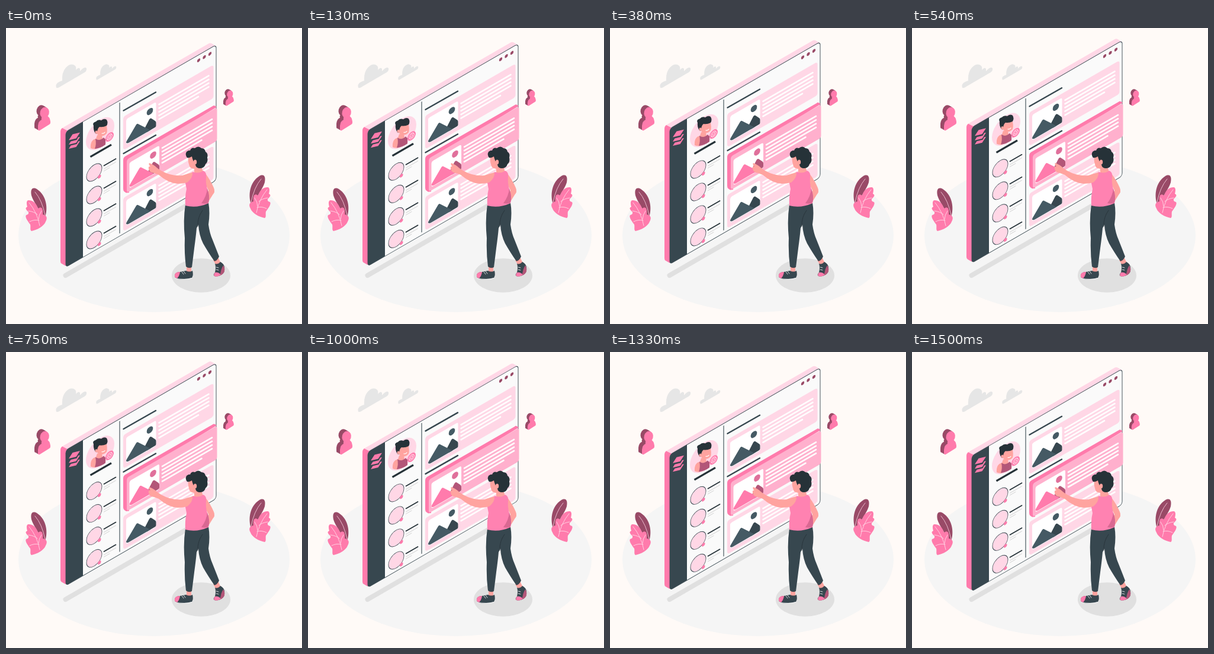
These frames come from a looping animation (500 px wide and 500 px high, 1540 ms). An HTML page:

```html
<!DOCTYPE html>
<html lang="en">
<head>
<meta charset="utf-8">
<title>Floating interface</title>
<style>
  html, body { margin: 0; width: 100%; height: 100%; overflow: hidden; background: #fffaf7; }
  svg { display: block; width: 100vw; height: 100vh; }
  .pink { fill: #ff7bac; }
  .pale { fill: #ffd7e6; }
  .plum { fill: #994a67; }
  .slate { fill: #37474f; }
  .skin { fill: #ffa39f; }
  .hair { fill: #263238; }
  .white { fill: #fff; }
  .line { fill: none; stroke-linecap: round; stroke-linejoin: round; }
</style>
</head>
<body>
<svg viewBox="0 0 500 500">
  <defs>
    <path id="cloud" d="M85 101Q83 95 88 92Q91 90 95 89Q94 75 101 67Q110 58 117 64Q119 66 118 71Q123 65 125 69V73Q133 64 136 68Q137 73 131 76L90 100Q87 102 85 101Z" fill="#e6e6e6"/>
    <g id="userShape">
      <ellipse cx="65.200" cy="143" rx="7.600" ry="9.300" transform="rotate(15 65.200 143)"/>
      <path d="M54 171V165Q55 157 60 155Q59 152 61 150L69 148Q74 150 75 158V160Q75 162 73 163L57 173Q54 174 54 171Z"/>
    </g>
    <g id="user">
      <g class="plum">
        <use href="#userShape" x="-6" y="-3.500"/>
        <use href="#userShape" x="-4" y="-2.400"/>
        <use href="#userShape" x="-2" y="-1.200"/>
      </g>
      <use href="#userShape" class="pink"/>
    </g>
    <g id="plant">
      <path class="plum" d="M66 320C71 305 69 283 52 272C44 268 41 273 43 283C46 293 54 302 62 320Z"/>
      <path class="line" d="M49 277Q61 291 66 316" stroke="#ffd7e6" stroke-width=".8"/>
      <path class="pink" d="M43 343C40 341 42 337 41 332C35 324 32 319 34 316Q39 315 38 311C33 306 32 304 36 302C34 295 35 291 38 291C46 291 52 297 54 305C60 301 63 304 62 315C68 316 71 320 67 327C64 335 53 341 43 343Z"/>
      <path class="line" d="M39 295Q53 312 57 334M38 309Q47 310 53 315M40 327Q48 323 56 325M60 309Q55 316 55 323" stroke="#ffe4ee" stroke-width=".8"/>
    </g>
    <g id="row">
      <circle r="13" transform="matrix(1 -.5774 0 1 149 244)" class="pale" stroke="#37474f" stroke-width=".8"/>
      <circle r="2.800" transform="matrix(1 -.5774 0 1 157.800 251)" class="pink"/>
      <path class="line" d="M165.500 232.500L185.500 221" stroke="#263238" stroke-width="1.800"/>
      <path class="line" d="M165.500 238L185.500 226.500M165.500 241.500L175 236" stroke="#c7c7c7" stroke-width=".8"/>
    </g>
    <!-- Peaks take their colours from the card that holds them -->
    <g id="cardContent">
      <rect width="50.500" height="43" rx="3" transform="matrix(1 -.5774 0 1 203 154)" class="white"/>
      <path d="M234 170L242 154.500Q244 151.500 246 153L252 157Q253.500 158 253.500 160V165Q253.500 167 251.500 168L238 176Z" fill="var(--small)"/>
      <path d="M204 190.500L219.500 164Q221.500 160.500 224 162.500L244 172.500L207 194Q201 196 204 190.500Z" fill="var(--big)"/>
      <circle r="5.300" transform="matrix(1 -.5774 0 1 243 141)" fill="var(--sun)"/>
      <path class="line" d="M258.500 129L342.500 80.500M258.500 135.300L342.500 86.800M258.500 141.600L342.500 93.100M258.500 147.900L342.500 99.400M258.500 154.200L325 115.800" stroke="#fff" stroke-width="2.600"/>
    </g>
    <rect id="cardFace" width="152.500" height="56.500" rx="4" transform="matrix(1 -.5774 0 1 198 150)"/>
    <g id="card" style="--big:#455a64;--small:#37474f;--sun:#455a64">
      <use href="#cardFace" class="pale"/>
      <use href="#cardContent"/>
    </g>
  </defs>

  <ellipse cx="250" cy="350.500" rx="229" ry="129.500" fill="#f5f5f5"/>
  <path class="line" d="M100.500 418L322 290" stroke="#e0e0e0" stroke-width="8"/>
  <ellipse cx="329.500" cy="418" rx="49.500" ry="28.700" fill="#e0e0e0"/>
  <use href="#cloud"/>
  <use href="#cloud" transform="translate(96.500 20.500) scale(.66)"/>
  <use href="#user"/>
  <use href="#user" transform="translate(335.300 17.200) scale(.66)"/>
  <use href="#plant"/>
  <use href="#plant" transform="translate(480 -22) scale(-1 1)"/>

  <g id="panel">
    <path class="pale" d="M94 169.500L342 26.500Q345 24.500 348 26.500L354 30L350 35L104 178Z"/>
    <path class="pink" d="M92 175Q92 171 95 169L105 174Q101 177 101 181V402L94 398Q92 397 92 394Z"/>
    <g transform="matrix(1 -.5774 0 1 101 175)">
      <rect width="254" height="229" rx="5" fill="#fafafa" stroke="#37474f" stroke-width=".9"/>
      <path class="slate" d="M0 5Q0 0 5 0H29V229H5Q0 229 0 224Z"/>
      <path class="line" d="M91 4V224" stroke="#37474f" stroke-width="1.100"/>
      <g class="plum">
        <circle cx="224.500" cy="9.200" r="2.700"/>
        <circle cx="234" cy="9.200" r="2.700"/>
        <circle cx="243.500" cy="9.200" r="2.700"/>
      </g>
      <circle class="pale" cx="58" cy="37" r="24"/>
    </g>
    <path class="pink" d="M106 189.500L112.500 179.500L125 176.500L118.500 186.500ZM106 197L109.500 191.500L119.500 189L122 184.500L125 184L118.500 194ZM106 204L109.500 198.500L119.500 196L122 191.500L125 191L118.500 201Z"/>

    <path class="skin" d="M152 187Q142 189 143 203Q147 205 153 204L156 195L163 187L162 181H154Z"/>
    <path fill="#b35678" d="M151 187Q158 192 165 185L168 188V197Q160 203 150 204Q153 196 151 187Z"/>
    <path class="skin" d="M151 167L169 161Q172 172 170 178Q165 184 157 182Q151 178 151 167Z"/>
    <path class="hair" d="M151 178Q147 172 148 165Q145 160 152 158Q155 154 161 156Q166 152 170 155Q173 160 170 165Q164 168 158 167Q155 169 154 175L153 179Z"/>
    <ellipse class="skin" cx="152.500" cy="176" rx="2" ry="2.700"/>
    <path class="line" d="M162 178Q165 178.500 167 176" stroke="#fff" stroke-width="1.200"/>
    <g transform="matrix(1 -.5774 0 1 175 184)">
      <circle class="pink" r="7"/>
      <circle class="line" r="4.300" stroke="#fff" stroke-width=".8"/>
      <circle class="line" r="2" stroke="#fff" stroke-width=".8"/>
    </g>
    <path d="M142.500 217.500L178 197" stroke="#263238" stroke-width="3.200"/>

    <use href="#row"/>
    <use href="#row" y="38"/>
    <use href="#row" y="76"/>
    <use href="#row" y="114"/>

    <path class="line" d="M198.500 139.500L253 108.500M198.500 212L253 181" stroke="#37474f" stroke-width="2.400"/>
    <use href="#card"/>
    <use href="#card" y="137"/>
    <path class="pink" d="M198 223Q198 219 201 217L349 132Q351 130 353 131.500L356 133.500L208 224V278L203 278.500L200 276.500Q198 275 198 272Z"/>
    <use href="#cardFace" x="6" y="72" fill="#ffb0cd"/>
    <g style="--big:#ff7bac;--small:#b35678;--sun:#e0709b">
      <use href="#cardContent" x="5.500" y="73.500"/>
    </g>
  </g>

  <g id="person">
    <path class="skin" d="M305 401V414H313V402ZM350 392L355 401L363 397L358 387Z"/>
    <g transform="translate(0 1)">
      <path class="slate" d="M304 409Q310 412 315 409Q317 416 314 421Q304 424 290 423Q284 421 285 416Q287 411 294 411Z"/>
      <path class="pink" d="M294 411Q286 411 285 416Q284 421 289 422Q293 418 294 411Z"/>
      <path class="line" d="M286 422Q302 425 314 421.500M297 411L300 415M300 410L303 414" stroke="#fff" stroke-width=".8"/>
      <path class="slate" d="M353 397Q358 399 362 394Q368 397 369 403Q370 412 365 415Q358 420 352 418Q349 416 353 412Q355 403 353 397Z"/>
      <path fill="#b35678" d="M367 400Q370 404 369 410Q367 415 362 417Q362 408 367 400Z"/>
      <path class="pink" d="M352 418Q350 416 353 412Q359 411 363 416Q357 420 352 418Z"/>
      <path class="line" d="M355 403L359 404M355 407L359 408" stroke="#fff" stroke-width=".8"/>
    </g>
    <path class="slate" d="M303 298Q322 304 342 295Q345 312 342 332Q344 347 349 358L360 386Q357 393 352 394Q341 378 333 364Q326 350 325 332L322 338Q321 350 318 372L314 404Q309 407 304 403Q301 380 302 355Q299 325 303 298Z"/>
    <path class="line" d="M324 335Q323 320 332 308" stroke="#263238" stroke-width=".8"/>
    <path class="skin" d="M337 246Q346 258 351 270Q354 277 349 282Q344 290 341 295L338 289Q341 280 342 274L336 262Z"/>
    <path class="skin" d="M308 215Q307 225 309 230Q310 236 314 237L318 238V246L325 251L333 244L328 226L320 213Z"/>
    <path fill="#ff82b1" d="M316 243Q325 247 333 241Q339 243 338 252Q337 262 340 272Q345 285 342 296Q322 305 303 300Q302 285 305 272L303 262Q302 250 316 243Z"/>
    <path fill="#d96892" d="M340 271Q339 284 330 296Q338 298 342 295Q345 285 340 271Z"/>
    <path class="skin" d="M315 244Q306 246 298 249Q280 251 262 241L256 237Q250 231 242 228Q240 230 244 234Q240 233 241 238Q242 244 250 245L258 248Q274 262 290 263Q299 263 306 261Q316 253 315 244Z"/>
    <path class="hair" d="M306 219Q302 214 305 209Q309 206 311 207Q313 201 319 203Q325 198 330 203Q336 203 337 209Q342 212 340 219Q342 226 337 230Q335 237 328 237Q321 237 320 231Q315 223 314 217Q309 220 306 219Z"/>
    <ellipse class="skin" cx="319.500" cy="226.500" rx="2.700" ry="4"/>
  </g>
</svg>
<script>
  const LOOP = 1540, HALF = 750, LIFT = 10, LEAD = 20, BASE = .3;
  const panel = document.getElementById('panel');

  // Steady rise and fall; the loop begins just after the lowest point
  function draw(now) {
    const t = now % LOOP + LEAD;
    const height = LIFT * Math.max(0, 1 - Math.abs(t / HALF - 1));
    panel.setAttribute('transform', `translate(0 ${BASE - height})`);
    requestAnimationFrame(draw);
  }
  draw(0);
</script>
</body>
</html>
```
